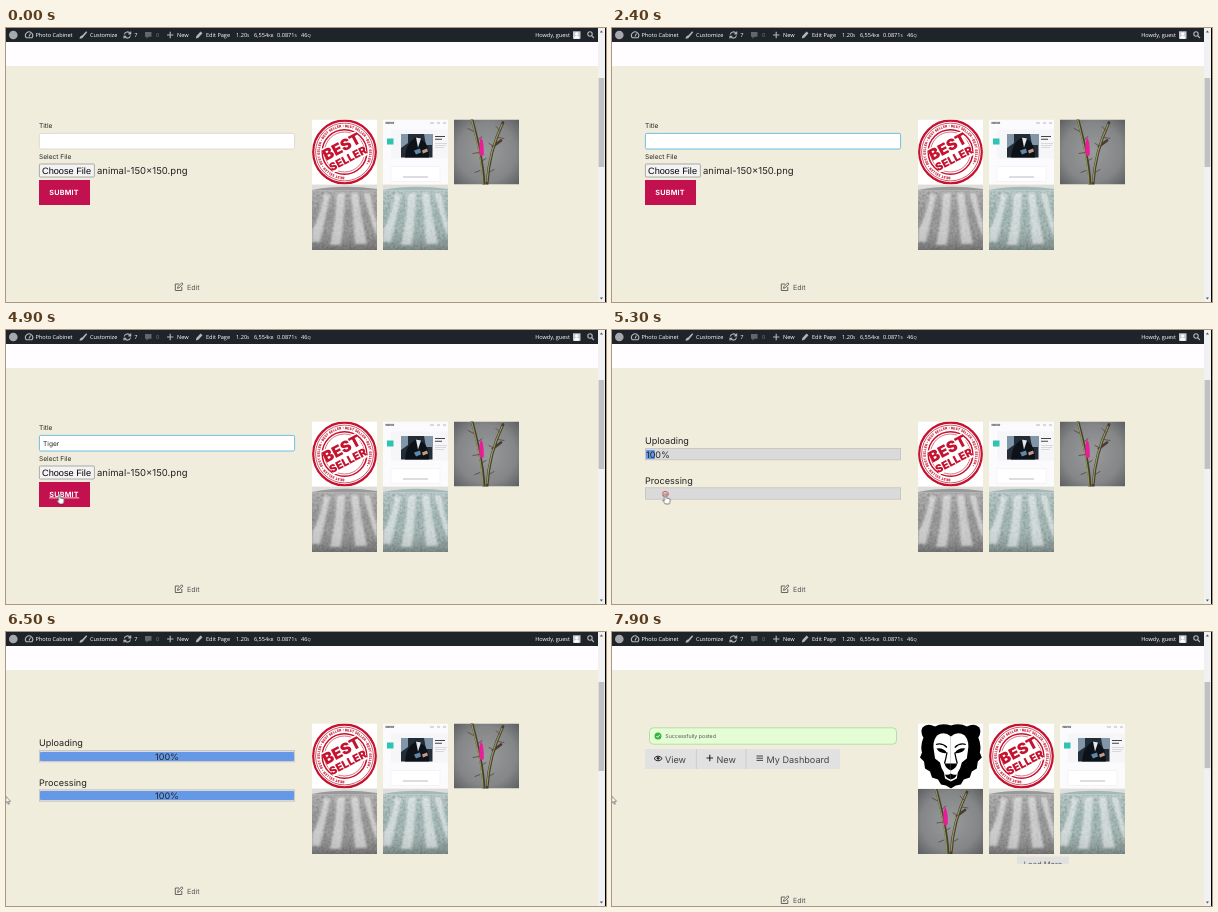
These frames come from a looping animation (600x274 px, 8 s). An HTML page:

```html
<!DOCTYPE html>
<html lang="en">
<head>
<meta charset="utf-8">
<title>Upload form</title>
<style>
html, body { margin: 0; width: 100%; height: 100%; overflow: hidden; background: #fffdff; }
svg.stage { display: block; width: 600px; height: 274px; }
text, .fill { font-family: Inter, sans-serif; text-rendering: geometricPrecision; fill: #222; color: #222; }
.bar text { font: 5.6px "Open Sans", "Noto Sans", sans-serif; fill: #fff; }
.bar .unit { font-size: 4.2px; }
.label { font-size: 6.6px; }
.big { font-size: 9.1px; }
.line { fill: none; stroke: #b4b7ba; stroke-width: 1.1; }

/* Scenes: hard cuts inside one 8 s loop */
.cut { animation: 8s step-end infinite; }
.form { animation-name: form; }
.upload { animation-name: upload; }
.done { animation-name: done; }
.before { animation-name: before; }
.after { animation-name: after; }
.wait { animation-name: wait; }
.focus { animation-name: focus; }
.hover { animation-name: hover; }
.hand { animation-name: hand; }
.arrow { animation-name: arrow; }
.ring { animation-name: ring; }
.percent1 { animation-name: percent1; }
.percent2 { animation-name: percent2; }
.foot { animation-name: foot; }
.cover { animation-name: cover; }
.thumb { animation-name: thumb; transform-origin: 595px 50px; }
.dot1 { animation-name: dot1; }
.dot2 { animation-name: dot2; }
@keyframes form { 0% { opacity: 1 } 63.75%, 100% { opacity: 0 } }
@keyframes upload { 0% { opacity: 0 } 63.75% { opacity: 1 } 85%, 100% { opacity: 0 } }
@keyframes done { 0% { opacity: 0 } 85%, 100% { opacity: 1 } }
@keyframes before { 0% { opacity: 1 } 85%, 100% { opacity: 0 } }
@keyframes after { 0% { opacity: 0 } 96.25%, 100% { opacity: 1 } }
@keyframes wait { 0% { opacity: 0 } 85% { opacity: 1 } 96.25%, 100% { opacity: 0 } }
@keyframes focus { 0% { stroke: #dcd9d2 } 18.75%, 100% { stroke: #5fb9de } }
@keyframes hover { 0% { opacity: 0 } 58.75%, 100% { opacity: 1 } }
@keyframes hand { 0% { opacity: 0 } 58.75% { opacity: 1 } 75%, 100% { opacity: 0 } }
@keyframes arrow { 0% { opacity: 0 } 52.5% { opacity: 1 } 58.75% { opacity: 0 } 75%, 100% { opacity: 1 } }
@keyframes ring { 0% { opacity: 0 } 63.75% { opacity: 1 } 73.75%, 100% { opacity: 0 } }
@keyframes percent1 { 0% { opacity: 0 } 65%, 100% { opacity: 1 } }
@keyframes percent2 { 0% { opacity: 0 } 75.25%, 100% { opacity: 1 } }
@keyframes foot {
  0% { transform: none } 85% { transform: translateY(-99px) } 96.25% { transform: translateY(-53px) }
  97.5% { transform: translateY(-18px) } 98.75%, 100% { transform: translateY(9px) }
}
@keyframes cover {
  0% { transform: translateY(-62px) } 97.5% { transform: translateY(-27px) } 98.75%, 100% { transform: none }
}
@keyframes thumb { 0% { transform: none } 96.25%, 100% { transform: scaleY(.97) } }
@keyframes dot1 { 0% { fill: #777 } 91.25%, 100% { fill: #c9c7bf } }
@keyframes dot2 { 0% { fill: #c9c7bf } 91.25%, 100% { fill: #666 } }

/* Typed letters */
.key { animation: key 8s step-end calc(var(--i) * .2s) infinite backwards; }
@keyframes key { 0% { fill-opacity: 0 } 32.5% { fill-opacity: 1 } 80%, 100% { fill-opacity: 0 } }

/* Progress bars and pointer */
.track { fill: #dadada; stroke: #c2c2c2; stroke-width: .8; }
.fill {
  height: 9.2px; font-size: 9px; line-height: 12.5px; text-align: center; white-space: nowrap;
  background: #6698e8; border-radius: 1px; animation: 8s cubic-bezier(.37,0,.63,1) infinite;
}
.fill1 { animation-name: fill1; }
.fill2 { animation-name: fill2; }
@keyframes fill1 { 0%, 65% { width: 0 } 75.25%, 100% { width: 254px } }
@keyframes fill2 { 0%, 75.25% { width: 0 } 81.25%, 100% { width: 254px } }
.pointer { animation: pointer 8s ease-in-out infinite; }
@keyframes pointer {
  0%, 52.5% { transform: translate(74px, 124px) }
  60%, 75% { transform: translate(53.5px, 164px) }
  81.25%, 100% { transform: translate(-.5px, 164px) }
}
</style>
</head>
<body>
<svg class="stage" viewBox="0 0 600 274" xmlns="http://www.w3.org/2000/svg">
<defs>
  <radialGradient id="wall" r=".75"><stop offset="0" stop-color="#999a9c"/><stop offset=".6" stop-color="#858688"/><stop offset="1" stop-color="#55575a"/></radialGradient>
  <linearGradient id="shade" x2="0" y2="1"><stop offset="0" stop-color="#fff" stop-opacity=".25"/><stop offset=".45" stop-color="#fff" stop-opacity="0"/><stop offset="1" stop-color="#333" stop-opacity=".35"/></linearGradient>
  <filter id="soft"><feGaussianBlur stdDeviation="1.1"/></filter>
  <filter id="fuzz" x="0" y="0" width="1" height="1">
    <feTurbulence type="fractalNoise" baseFrequency=".4" numOctaves="2" seed="4"/>
    <feColorMatrix values="0 0 0 0 0  0 0 0 0 0  0 0 0 0 0  1.6 0 0 0 -.6"/>
  </filter>
  <path id="orbit" d="M32.5 57.200a24.700 24.700 0 1 1 .01 0"/>

  <symbol id="stamp" viewBox="0 0 65 65">
    <path fill="#fff" d="M0 0h65v65H0z"/>
    <g fill="none" stroke="#c5122e">
      <circle cx="32.500" cy="32.500" r="31.300" stroke-width="2.200"/>
      <circle cx="32.500" cy="32.500" r="28.900" stroke-width=".7"/>
      <circle cx="32.500" cy="32.500" r="22.300" stroke-width="1.500"/>
      <circle cx="32.500" cy="32.500" r="20" stroke-width=".6"/>
    </g>
    <g font-weight="800" text-anchor="middle" style="--red:#c5122e">
      <text font-size="3.500" text-anchor="start" style="fill:var(--red)"><textPath href="#orbit">BEST SELLER • BEST SELLER • BEST SELLER • BEST SELLER • BEST SELLER •</textPath></text>
      <g transform="rotate(-28 32.500 32.500)">
        <path fill="#fff" d="M13 19h39v27H13z"/>
        <text x="32.500" y="32" font-size="15.500" font-weight="900" style="fill:var(--red)">BEST</text>
        <text x="32.500" y="43.800" font-size="11" font-weight="900" style="fill:var(--red)">SELLER</text>
      </g>
    </g>
  </symbol>

  <symbol id="site" viewBox="0 0 65 65">
    <path fill="#fbfafc" d="M0 0h65v65H0z"/>
    <text x="2.500" y="4.300" font-size="3" font-weight="700">NOVO</text>
    <path stroke="#9a9a9f" stroke-width=".7" d="M47 3.500h4m3 0h3m3 0h3"/>
    <path fill="#f6f5f8" d="M8 10h57v29H8z"/>
    <path fill="#222d38" d="M18 14.500h31.500v23.500H18z"/>
    <path fill="#8196a8" d="M18 14.500h7v9l-7 5zm23 0h8.500v11H43z"/>
    <path fill="#0d1219" d="M22 38q1-14 8-18l4-3 6 4q6 4 6 17z"/>
    <path fill="#e3e6ea" d="m33 18 2 10 3-9z"/>
    <path fill="#5f87a8" d="M31 31l6-2 1 4-5 2z"/>
    <path fill="#c49a86" d="M39 31l5-2 1 3-5 2z"/>
    <path fill="#2fc4b2" d="M4 19h6.500v6H4z"/>
    <path stroke="#444" stroke-width="1.100" d="M52 17h10m-10 2.700h7"/>
    <path stroke="#c4c4c9" stroke-width=".6" d="M52 24h12m-12 2h11m-11 2h9"/>
    <path fill="#fff" stroke="#f1eff3" stroke-width=".6" d="M8 47h49v15H8z"/>
    <path stroke="#aaa8ae" stroke-width=".8" d="M20 57.500h25"/>
  </symbol>

  <symbol id="plant" viewBox="0 0 65 65">
    <path fill="url(#wall)" d="M0 0h65v65H0z"/>
    <g fill="none" stroke-linecap="round">
      <path stroke="#4a3d30" stroke-width="2.800" d="M30 65Q29 40 18 0M33 65Q35 32 49 3m-10 24 8-6"/>
      <path stroke="#8c9a5c" stroke-width="1.200" d="M29 65Q28 40 17.500 0M33 62Q35 32 48 5"/>
      <path stroke="#57443a" stroke-width=".8" d="m20 12-6-3m9 12 5-4m-3 16-6 1m8 8 5-3m9-12-6-3m9-6 6 1m-4-8-4-4m-16 44-5 2m14 0 5-3"/>
    </g>
    <path fill="#e91e97" d="M27 18q3 3 2.800 17-1.800 3-4.200 0Q24.500 22 27 18z"/>
  </symbol>

  <symbol id="towel" viewBox="0 0 65 65">
    <path fill="#dcdddc" d="M0 0h65v65H0z"/>
    <path fill="currentColor" d="M0 5Q30-1 65 4v61H0z"/>
    <path fill="url(#shade)" d="M0 5h65v60H0z"/>
    <path filter="url(#fuzz)" opacity=".22" d="M0 6h65v59H0z"/>
    <g fill="#fff" opacity=".5" filter="url(#soft)">
      <path d="M12 9h6Q14 32 8 57H0V46Q9 28 12 9z"/>
      <path d="M25 8h8Q32 32 29 60H18Q24 32 25 8z"/>
      <path d="M39 8h7Q49 32 55 59H43Q41 32 39 8z"/>
      <path d="M52 8h6Q60 24 65 36v16Q56 30 52 8z"/>
    </g>
  </symbol>

  <g id="half">
    <path d="M33 2Q24-1 17 3 9-1 4.500 4 2 9 5.500 14 2 22 4 29l-2 5 4 4 1 7 5 3 2 6 6 2 3 5 5 1 5 3z"/>
    <path fill="#fff" d="M33 13Q26 7 19 12 14 18 16 28l1 7 5 4q1 6 4 10l1 6 6 3z"/>
    <path d="M18.500 25q7-1 10.500 4.500-7 1-10.500-4.500zM33 40h-6.500q1 5 6.500 7zM33 50q-3 2-6 1 1 4 6 5z"/>
    <path fill="none" stroke="#000" stroke-width="1.300" d="M29 29q-1 6-2.500 11M18 21q6-2 11 3"/>
  </g>
  <symbol id="lion" viewBox="0 0 65 65">
    <path fill="#fff" d="M0 0h65v65H0z"/>
    <use href="#half"/><use href="#half" transform="matrix(-1 0 0 1 65.800 0)"/>
  </symbol>
</defs>

<rect width="600" height="274" fill="#fffdff"/>
<rect y="38" width="592" height="236" fill="#f1eddd"/>

<g class="cut after">
  <use href="#lion" x="306" y="91.500" width="65" height="65"/>
  <use href="#stamp" x="377" y="91.500" width="65" height="65"/>
  <use href="#site" x="448" y="91.500" width="65" height="65"/>
  <use href="#plant" x="306" y="157" width="65" height="65"/>
  <use href="#towel" x="377" y="157" width="65" height="65" color="#999"/>
  <use href="#towel" x="448" y="157" width="65" height="65" color="#a3b9b6"/>
  <rect x="405" y="224.500" width="52" height="16" fill="#e1e1e0"/>
  <text x="431" y="235.300" font-size="7.600" text-anchor="middle" style="fill:#555">Load More</text>
  <rect class="cut cover" x="300" y="232" width="220" height="110" fill="#f1eddd"/>
</g>

<g class="cut before">
  <use href="#stamp" x="306" y="91.500" width="65" height="65"/>
  <use href="#site" x="377" y="91.500" width="65" height="65"/>
  <use href="#plant" x="448" y="91.500" width="65" height="65"/>
  <use href="#towel" x="306" y="157" width="65" height="65" color="#999"/>
  <use href="#towel" x="377" y="157" width="65" height="65" color="#a3b9b6"/>
</g>

<g class="cut wait">
  <circle class="cut dot1" cx="306" cy="108.700" r="1.300"/>
  <circle class="cut dot2" cx="310.500" cy="108.700" r="1.400"/>
  <circle cx="315" cy="108.700" r="1.300" fill="#c9c7bf"/>
</g>

<g class="cut foot">
  <rect y="299" width="592" height="120" fill="#fffdff"/>
  <g fill="none" stroke="#555" stroke-width=".9">
    <path d="M173 256h-3.700v6.500h6.500V259"/>
    <path d="m171.500 260.300.5-1.800 3.700-3.700 1.300 1.300-3.700 3.700z"/>
  </g>
  <text x="181" y="261.500" font-size="7.100" style="fill:#555">Edit</text>
  <text x="33" y="351" font-size="17" font-weight="700" letter-spacing="-.4" style="fill:#000">Search</text>
  <rect x="33.500" y="370" width="221" height="17" fill="#fff" stroke="#d9d6d4"/>
  <rect x="255" y="369.500" width="54" height="18" fill="#c3104f"/>
</g>

<g class="cut form">
  <text class="label" x="33" y="100.200">Title</text>
  <rect class="cut focus" x="33.400" y="105.400" width="255.200" height="15.600" rx="1.500" fill="#fff" stroke-width=".9"/>
  <text class="label" x="37" y="115.800"><tspan class="key" style="--i:0">T</tspan><tspan class="key" style="--i:1">i</tspan><tspan class="key" style="--i:2">g</tspan><tspan class="key" style="--i:3">e</tspan><tspan class="key" style="--i:4">r</tspan></text>
  <text class="label" x="33" y="130.800">Select File</text>
  <rect x="33.400" y="136" width="55" height="13" rx="1" fill="#f3f3f3" stroke="#999" stroke-width=".8"/>
  <text x="36" y="145.700" style="font:9.200px 'Liberation Sans',Arial,sans-serif;fill:#000">Choose File</text>
  <text x="91" y="145.700" font-size="9.500">animal-150×150.png</text>
  <rect x="33" y="152" width="51" height="25" fill="#c3104f"/>
  <text x="43.200" y="166.500" font-size="7.200" font-weight="700" letter-spacing=".24" style="fill:#fff">SUBMIT</text>
  <rect class="cut hover" x="43.200" y="167.500" width="30" height=".8" fill="#fff"/>
</g>

<g class="cut upload">
  <text class="big" x="33" y="114.300">Uploading</text>
  <rect class="track" x="33.400" y="118.400" width="255.200" height="11.400"/>
  <foreignObject x="34" y="119.500" width="254" height="14">
    <div class="fill fill1"><span class="cut percent1">100%</span></div>
  </foreignObject>
  <text class="big" x="33" y="153.500">Processing</text>
  <rect class="track" x="33.400" y="157.800" width="255.200" height="11.400"/>
  <foreignObject x="34" y="158.900" width="254" height="14">
    <div class="fill fill2"><span class="cut percent2">100%</span></div>
  </foreignObject>
</g>

<g class="cut done">
  <rect x="37.500" y="95.800" width="247" height="16.400" rx="4" fill="#e5fdd5" stroke="#a6d997" stroke-width=".8"/>
  <circle cx="46" cy="103.900" r="3.500" fill="#37b53c"/>
  <path fill="none" stroke="#fff" stroke-width=".9" d="m44.300 104 1.300 1.300 2.400-2.600"/>
  <text x="53.300" y="105.700" font-size="5.300" style="fill:#555">Successfully posted</text>
  <rect x="33" y="117" width="195" height="20" fill="#e1e1e1"/>
  <path stroke="#c9c9c9" stroke-width=".8" d="M84.400 117v20m49.600-20v20"/>
  <g class="big">
    <text x="53" y="130.500" style="fill:#444">View</text>
    <text x="104.500" y="130.500" style="fill:#444">New</text>
    <text x="154.500" y="130.500" style="fill:#444">My Dashboard</text>
  </g>
  <path fill="none" stroke="#222" d="M42 126.500q4-4.800 8.200 0-4.200 4.800-8.200 0z"/>
  <circle cx="46.100" cy="126.300" r="1.400" fill="#222"/>
  <path fill="none" stroke="#222" stroke-width="1.100" d="M94.500 126h6.600m-3.300-3.300v6.600"/>
  <path stroke="#333" stroke-width=".9" d="M144.500 124h6.500m-6.500 2.200h6.500m-6.500 2.200h6.500"/>
</g>

<g class="bar">
  <rect width="592" height="14" fill="#1f242a"/>
  <circle cx="7.300" cy="7" r="4.300" fill="#a5a9ad"/>
  <path class="line" d="M20.300 9.800a3.600 3.600 0 1 1 5.600 0zM23 8.500l1.500-3"/>
  <text x="29.500" y="9">Photo Cabinet</text>
  <path fill="#b4b7ba" d="M73.500 10.800q.3-3 2.700-3.300l4-4.200 1 1-3.700 4.500q-.7 2-4 2z"/>
  <text x="84" y="9">Customize</text>
  <path class="line" d="M118.200 6.500a3.200 3.200 0 0 1 6-.8m.3 1.800a3.200 3.200 0 0 1-6 .8M124.700 3.500v2.400h-2.300m-4.400 4.600V8.200h2.300"/>
  <text x="128.300" y="9">7</text>
  <path fill="#62676c" d="M139 4h6.500v4.700h-3l-2 2V8.700H139z"/>
  <text x="150" y="9" style="fill:#777c81">0</text>
  <path class="line" stroke-width="1.300" d="M161 7h6.400m-3.200-3.200v6.400"/>
  <text x="171" y="9">New</text>
  <path fill="#b4b7ba" d="m189.800 10.500.6-2.600 4.200-4.500 1.900 1.900-4.200 4.500z"/>
  <text x="200" y="9">Edit Page</text>
  <text x="230" y="9">1.20<tspan class="unit">S</tspan></text>
  <text x="248" y="9">6,554<tspan class="unit">KB</tspan></text>
  <text x="271" y="9">0.0871<tspan class="unit">S</tspan></text>
  <text x="295" y="9">46<tspan class="unit">Q</tspan></text>
  <text x="564" y="9" text-anchor="end">Howdy, guest</text>
  <rect x="567" y="3.300" width="7.500" height="7.500" fill="#c9cbcd"/>
  <path fill="#fff" d="M568 10.800q0-3 2.700-3t2.700 3zM570.700 4.300a1.600 1.600 0 1 1-.01 0z"/>
  <circle class="line" cx="584" cy="6" r="2.200"/>
  <path class="line" stroke-width="1.400" d="m585.600 7.600 2.300 2.400"/>
</g>

<rect x="592" width="7" height="274" fill="#f1f1f1"/>
<rect class="cut thumb" x="592.600" y="50" width="5.600" height="89" fill="#c1c1c1"/>
<path fill="#555" d="m593.800 4.500 1.600-2 1.600 2zm0 265 1.600 2 1.600-2z"/>
<rect x="599" width="1" height="274" fill="#000"/>

<g class="pointer">
  <circle class="cut ring" r="2.600" cx="-.3" fill="none" stroke="#d8303c" stroke-width=".9"/>
  <path class="cut hand" fill="#fff" stroke="#333" stroke-width=".6" d="M-1 .8q0-1 .9-1t.9 1v3.200l3 .6q1 .3.900 1.400l-.4 2.400-.6 1.600h-3.800l-2.400-3.200q-.4-.9.700-.7l.8.600z"/>
  <path class="cut arrow" fill="#fff" stroke="#444" stroke-width=".6" d="M0 0v7.200l1.700-1.500 1.100 2.600 1-.4-1.100-2.600h2.200z"/>
</g>
</svg>
</body>
</html>
```
